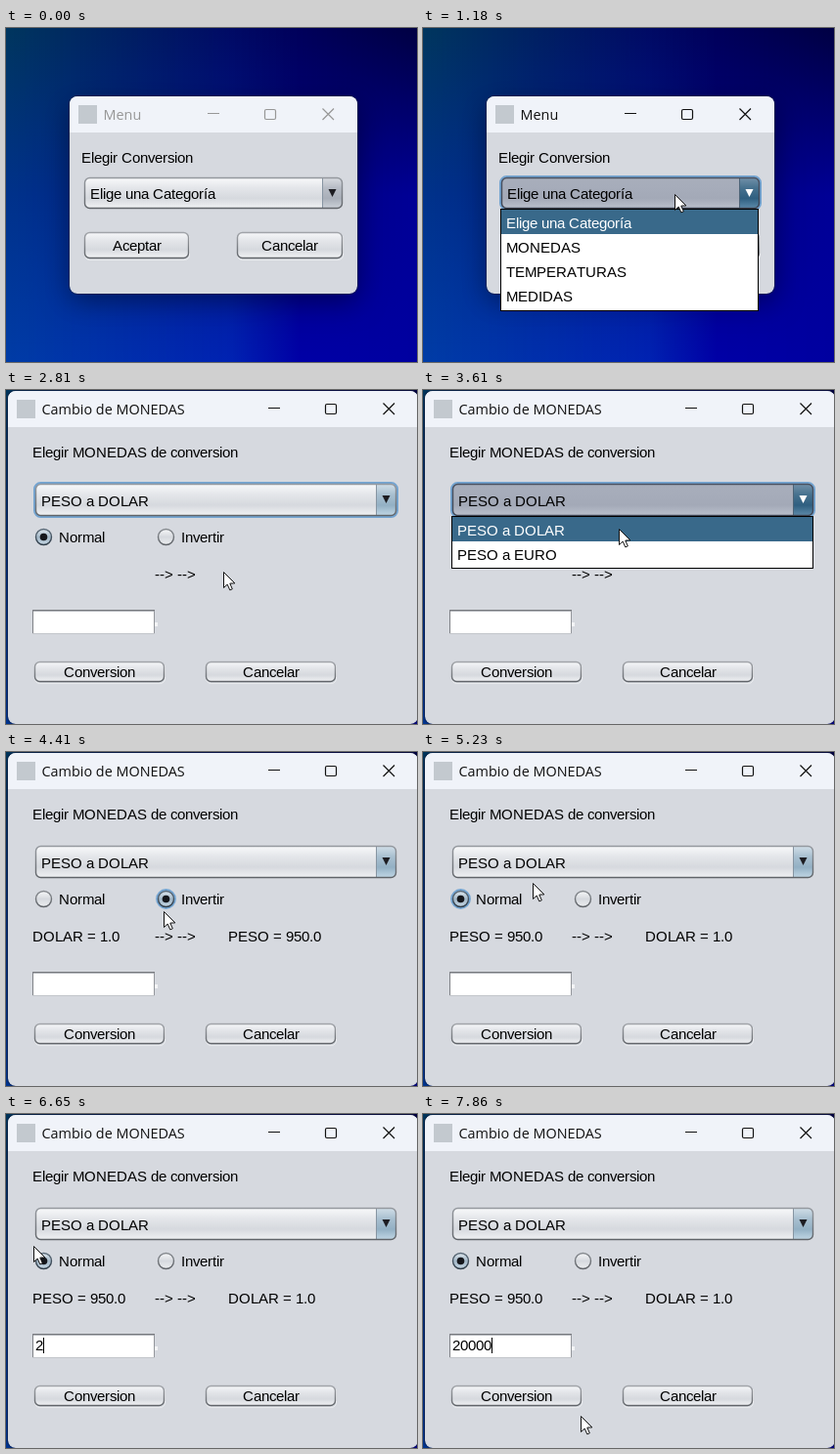
An HTML page with a canvas that plays this animation: 420x342 px, repeating every 8 s.

```html
<!DOCTYPE html>
<html lang="es">
<head>
<meta charset="utf-8">
<title>Menu</title>
<style>
html, body { margin: 0; width: 100%; height: 100%; overflow: hidden; background: #001a70; }
canvas { display: block; }
</style>
</head>
<body>
<canvas id="stage" width="420" height="342"></canvas>
<script>
const W = 420, H = 342, LOOP = 8000;
const canvas = document.getElementById('stage');
const ctx = canvas.getContext('2d');
const UI = '15px "Liberation Sans", Arial, sans-serif';
const TITLE = '14.4px "Open Sans", "Noto Sans", sans-serif';
const PANEL = '#d6d9df', SELECT = '#39698a', GLOW = '#73a4d1';

// The screen refreshes about every 200 ms; a few steps differ.
const ODD = { 5: 180, 6: 220, 13: 210, 24: 220, 28: 190, 29: 210, 32: 210, 35: 210, 38: 210 };
const starts = [0];
for (let i = 0; i < 39; i++) starts.push(starts[i] + (ODD[i] || 200));

// Pointer path: step, x, y
const PATH = [
  [1, 55, 325], [4, 250, 175], [6, 257, 170], [8, 190, 222], [9, 188, 224],
  [11, 159, 233], [12, 159, 233], [14, 222, 186], [16, 250, 115], [18, 200, 142],
  [20, 172, 150], [21, 162, 153], [22, 161, 163], [24, 58, 152], [28, 165, 116],
  [29, 157, 149], [30, 92, 226], [33, 28, 135], [36, 59, 167], [38, 165, 300], [39, 161, 309]
];

const within = (n, a, b) => n >= a && n <= b;

function vertical(y, h, colors) {
  const g = ctx.createLinearGradient(0, y, 0, y + h);
  colors.forEach((c, i) => g.addColorStop(i / (colors.length - 1), c));
  return g;
}

function box(x, y, w, h, r, fill, stroke, line = 1) {
  ctx.beginPath();
  ctx.roundRect(x, y, w, h, r);
  if (fill) { ctx.fillStyle = fill; ctx.fill(); }
  if (stroke) { ctx.strokeStyle = stroke; ctx.lineWidth = line; ctx.stroke(); }
}

function rect(x, y, w, h, color) {
  ctx.fillStyle = color;
  ctx.fillRect(x, y, w, h);
}

// Whole-pixel glyph advances, as in hinted UI text
const advance = ch => Math.round(ctx.measureText(ch).width - 0.05);

function textWidth(str) {
  ctx.font = UI;
  return [...str].reduce((sum, ch) => sum + advance(ch), 0);
}

function text(str, x, y, color = '#000') {
  ctx.font = UI;
  ctx.fillStyle = color;
  for (const ch of str) {
    ctx.fillText(ch, x, y);
    x += advance(ch);
  }
}

function makeDesktop() {
  const cols = [
    [0, [0, 54, 94], [0, 50, 138], [0, 60, 166]],
    [230, [0, 10, 100], [0, 20, 140], [0, 34, 178]],
    [300, [0, 0, 90], [0, 0, 132], [0, 0, 166]],
    [421, [0, 0, 66], [0, 0, 150], [0, 0, 160]]
  ];
  const c = document.createElement('canvas');
  c.width = W;
  c.height = H;
  const g = c.getContext('2d');
  for (let x = 0; x < W; x++) {
    const i = cols.findIndex(col => col[0] > x);
    const a = cols[i - 1], b = cols[i];
    const k = (x - a[0]) / (b[0] - a[0]);
    const grad = g.createLinearGradient(0, 0, 0, H);
    for (let s = 1; s < 4; s++) {
      const rgb = a[s].map((v, j) => Math.round(v + (b[s][j] - v) * k));
      grad.addColorStop((s - 1) / 2, `rgb(${rgb})`);
    }
    g.fillStyle = grad;
    g.fillRect(x, 0, 1, H);
  }
  return c;
}
const desktop = makeDesktop();

function frameWindow(x, y, right, bottom, title, active) {
  const w = right - x, h = bottom - y;
  ctx.save();
  ctx.shadowColor = 'rgba(0,0,0,.4)';
  ctx.shadowBlur = 28;
  ctx.shadowOffsetY = 8;
  box(x, y, w, h, 8, PANEL);
  ctx.restore();
  box(x - 0.5, y - 0.5, w + 1, h + 1, 8, null, 'rgba(20,30,60,.55)');
  box(x, y, w, 37, [8, 8, 0, 0], '#f0f3f9');
  box(x + 9, y + 9, 19, 19, 0, '#c3c9cf');

  const ink = active ? '#111' : '#979797';
  ctx.font = TITLE;
  ctx.fillStyle = ink;
  ctx.fillText(title, x + 34.5, y + 24);

  const cy = y + 18;
  rect(right - 153, y + 17, 12, 1, ink);
  box(right - 94.5, cy - 4.5, 11, 10, 1.5, null, ink, 1.2);
  ctx.beginPath();
  ctx.moveTo(right - 35.5, cy - 5.5);
  ctx.lineTo(right - 24, cy + 6);
  ctx.moveTo(right - 24, cy - 5.5);
  ctx.lineTo(right - 35.5, cy + 6);
  ctx.lineWidth = 1.2;
  ctx.stroke();
}

function button(label, x, y, w, h, hover) {
  const fill = hover ? ['#ffffff', '#eceef1', '#e6e8ec', '#ffffff']
                     : ['#f7f8fa', '#e3e5e9', '#d6d9de', '#f3f4f6'];
  box(x + 0.5, y + 1.5, w, h, 5, null, 'rgba(255,255,255,.5)');
  box(x + 0.5, y + 0.5, w - 1, h - 1, 5, vertical(y, h, fill),
    vertical(y, h, ['#a2a5aa', '#5f6368']), 1.4);
  text(label, x + Math.round((w - textWidth(label)) / 2), y + Math.round((h + 11) / 2));
}

function combo(label, x, y, w, h, { focus, open, active }) {
  if (focus) box(x - 0.5, y - 0.5, w + 1, h + 1, 6, null, GLOW, 3);
  const body = open ? ['#a8aebb', '#a6acba', '#a3a9b7', '#bbc1cd']
                    : ['#f9fafb', '#e4e6ea', '#d6d9de', '#f1f2f4'];
  const cap = open ? ['#7391a9', '#47728f', '#2f5f80', '#5f8cab']
    : active ? ['#d3e0e9', '#a9c0d0', '#93b0c4', '#c2d8e6']
    : ['#dadde2', '#b7bcc5', '#a9afb9', '#cdd2d9'];
  box(x + 0.5, y + 0.5, w - 1, h - 1, 5, vertical(y, h, body));
  const ax = x + w - 20;
  box(ax, y + 0.5, 19.5, h - 1, [0, 5, 5, 0], vertical(y, h, cap));
  rect(ax - 1, y + 1, 1, h - 2, open ? '#4d6478' : '#8795a2');
  box(x + 0.5, y + 0.5, w - 1, h - 1, 5, null,
    vertical(y, h, open ? ['#4a5160', '#3c4351'] : ['#95999f', '#5f6368']), 1.4);

  const mx = x + w - 10.5, my = y + Math.floor(h / 2);
  ctx.beginPath();
  ctx.moveTo(mx - 4, my - 4);
  ctx.lineTo(mx + 4, my - 4);
  ctx.lineTo(mx, my + 4);
  ctx.fillStyle = open ? '#fff' : '#1d1d22';
  ctx.fill();
  text(label, x + 6, y + Math.round(h / 2) + 6);
}

function popup(items, x, y, w, h, hover) {
  rect(x, y, w, h, '#000');
  rect(x + 1, y + 1, w - 2, h - 2, '#fff');
  items.forEach((item, i) => {
    const on = i === hover;
    if (on) rect(x + 1, y + 1 + i * 25, w - 2, 25, SELECT);
    text(item, x + 6, y + 20 + i * 25, on ? '#fff' : '#000');
  });
}

function disc(x, y, r, fill, stroke, line) {
  ctx.beginPath();
  ctx.arc(x, y, r, 0, Math.PI * 2);
  if (fill) { ctx.fillStyle = fill; ctx.fill(); }
  if (stroke) { ctx.strokeStyle = stroke; ctx.lineWidth = line; ctx.stroke(); }
}

function radio(label, x, selected, focus) {
  const y = 150.5;
  if (focus) disc(x, y, 9.2, null, GLOW, 2.4);
  const fill = selected ? ['#dfe8ef', '#a3b7c7', '#c3d5e2'] : ['#f7f8f9', '#d6d9de', '#eceef0'];
  disc(x, y, 8, vertical(y - 8, 16, fill),
    vertical(y - 8, 16, selected ? ['#5b6a78', '#2f3c48'] : ['#85898e', '#5f6368']), 1.4);
  if (selected) disc(x, y, 3.8, '#15171c');
  text(label, x + 15.5, 156);
}

function pointer(x, y) {
  const shape = [[0, 0], [0, 16], [3.7, 12.6], [6.3, 18.4], [8.8, 17.3], [6.3, 11.6], [11.4, 11.4]];
  ctx.beginPath();
  shape.forEach(([dx, dy]) => ctx.lineTo(x + 0.5 + dx, y + 0.5 + dy));
  ctx.closePath();
  ctx.fillStyle = '#fff';
  ctx.fill();
  ctx.strokeStyle = '#111';
  ctx.lineWidth = 1;
  ctx.lineJoin = 'round';
  ctx.stroke();
}

function pointerAt(n) {
  const i = PATH.findIndex(p => p[0] >= n);
  const b = PATH[i], a = PATH[Math.max(0, i - 1)];
  const k = b === a ? 0 : (n - a[0]) / (b[0] - a[0]);
  return [1, 2].map(j => Math.round(a[j] + (b[j] - a[j]) * k));
}

function menuWindow(n) {
  const active = n >= 5, open = within(n, 5, 8);
  frameWindow(65, 70, 359, 272, 'Menu', active);
  text('Elegir Conversion', 77, 138);
  combo(n < 9 ? 'Elige una Categoría' : 'MONEDAS', 80, 153, 264, 32, { focus: active, open, active });
  button('Aceptar', 80, 209, 107, 27, n >= 10);
  button('Cancelar', 236, 209, 108, 27);
  if (open) {
    popup(['Elige una Categoría', 'MONEDAS', 'TEMPERATURAS', 'MEDIDAS'], 79, 185, 264, 105, n < 8 ? 0 : 1);
  }
}

function textField(n) {
  rect(27, 225, 125, 25, '#fff');
  rect(27, 225, 125, 1, '#77797e');
  rect(27, 226, 125, 1, '#b5b8bd');
  rect(27, 225, 1, 25, '#808287');
  rect(151, 226, 1, 24, '#94979c');
  rect(27, 249, 125, 1, '#c3c6cb');
  rect(152, 238, 3, 4, '#f4f5f7');
  const typed = '20000'.slice(0, Math.max(0, n - 32));
  text(typed, 30, 242);
  if (n >= 30) rect(30 + textWidth(typed), 229, 1, 16, '#000');
}

function currencyWindow(n) {
  const open = within(n, 17, 18) || within(n, 28, 29);
  const focus = n <= 20 || within(n, 27, 29);
  const inverted = within(n, 21, 23);
  frameWindow(2, 1, 421, 342, 'Cambio de MONEDAS', true);
  text('Elegir MONEDAS de conversion', 27, 69);
  combo('PESO a DOLAR', 30, 96, 369, 33, { focus, open, active: true });
  radio('Normal', 38.5, !inverted, within(n, 24, 26));
  radio('Invertir', 163.5, inverted, inverted);
  text('--> -->', 152, 194);
  if (n >= 19) {
    const pair = ['PESO = 950.0', 'DOLAR = 1.0'];
    if (inverted) pair.reverse();
    text(pair[0], 27, 194);
    text(pair[1], 227, 194);
  }
  textField(n);
  button('Conversion', 29, 278, 133, 21);
  button('Cancelar', 204, 278, 133, 21);
  if (open) popup(['PESO a DOLAR', 'PESO a EURO'], 29, 129, 370, 54, n === 17 || n === 28 ? -1 : 0);
}

function draw(n) {
  ctx.drawImage(desktop, 0, 0);
  if (n < 12) menuWindow(n);
  if (n > 12) currencyWindow(n);
  if (n > 0) pointer(...pointerAt(n));
}

function tick() {
  const t = performance.now() % LOOP;
  let n = starts.length - 1;
  while (starts[n] > t) n--;
  draw(n);
  requestAnimationFrame(tick);
}
tick();
</script>
</body>
</html>
```
